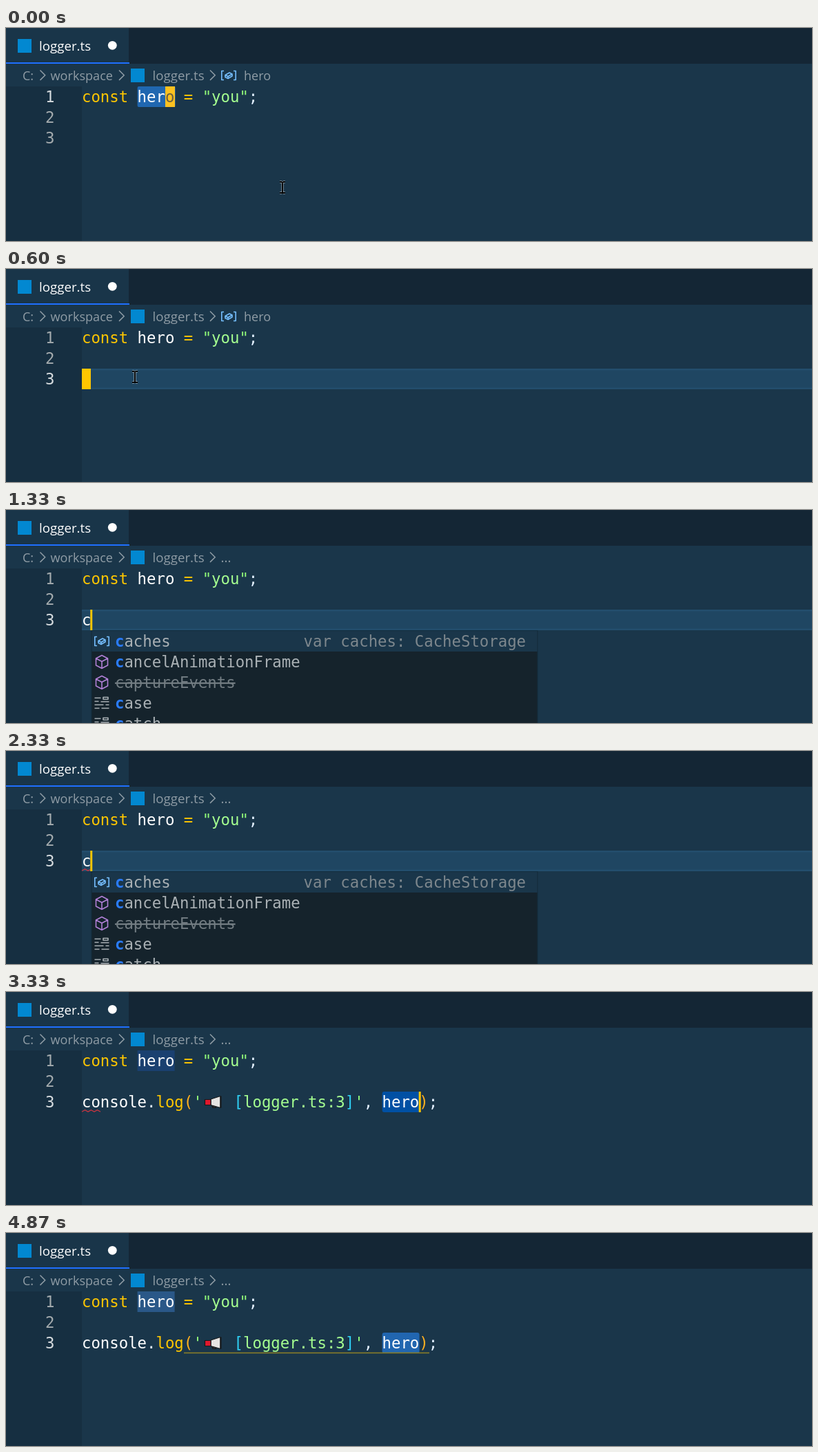
An HTML page for the animation above (5.4 s loop, 1169x310 px).

```html
<!DOCTYPE html>
<html lang="en">
<head>
<meta charset="utf-8">
<title>Logging snippet</title>
<style>
html, body { margin: 0; width: 100%; height: 100%; overflow: hidden; background: #193549; }
svg { display: block; width: 1169px; height: 310px; }
text { white-space: pre; }
.code { font: 22.32px "DejaVu Sans Mono", monospace; }
.ui { font-family: "Open Sans", sans-serif; }
.icon { fill: none; stroke-width: 1.6; stroke-linejoin: round; }
</style>
</head>
<body>
<svg id="stage" viewBox="0 0 1169 310"></svg>
<script>
const LOOP = 5400, CW = 13.44, LEFT = 110;
const C = {
  white: '#fff', yellow: '#ffc600', orange: '#ffb020', green: '#a5ff90', quote: '#92fc79',
  cyan: '#2fd0f5', grey: '#8f9ca5', dim: '#a3aaad', blue: '#2a7cff', pale: '#e1efff',
  field: '#75beff', violet: '#b180d7', label: '#a9b0b4', detail: '#7d878d'
};
const stage = document.getElementById('stage');

function add(parent, tag, attrs, content) {
  const node = document.createElementNS('http://www.w3.org/2000/svg', tag);
  for (const key in attrs) node.setAttribute(key, attrs[key]);
  if (content) node.textContent = content;
  parent.appendChild(node);
  return node;
}
const rect = (p, x, y, width, height, fill, more) => add(p, 'rect', { x, y, width, height, fill, ...more });
const path = (p, d, stroke, more) => add(p, 'path', { d, stroke, fill: 'none', ...more });
const ui = (p, x, y, size, fill, str) => add(p, 'text', { class: 'ui', x, y, 'font-size': size, fill }, str);

function code(p, x, y, runs, more) {
  const node = add(p, 'text', { class: 'code', x, y, ...more });
  for (const [fill, str, extra] of runs) add(node, 'tspan', { fill, ...extra }, str);
  return node;
}

// Hold each value in [[ms, value], ...] until the next one.
function steps(node, prop, table) {
  const frames = table.map(([ms, v]) => ({ offset: ms / LOOP, [prop]: v, easing: 'step-end' }));
  frames.push({ offset: 1, [prop]: table[table.length - 1][1] });
  node.animate(frames, { duration: LOOP, iterations: Infinity });
  return node;
}
function show(node, from, to) {
  const table = from ? [[0, 0], [from, 1]] : [[0, 1]];
  if (to) table.push([to, 0]);
  return steps(node, 'opacity', table);
}
const layer = (from, to) => show(add(stage, 'g', {}), from, to);

const ICONS = {
  field: [C.field, 'M-7 -6.5h-3.2v13h3.2M7 -6.5h3.2v13h-3.2M-5 -.5L1 -4L5 -2V1L-1 4.5L-5 2.5ZM-5 -.5L-1 1.5L5 -2M-1 1.5V4.5'],
  cube: [C.violet, 'M0 -9.5L8.5 -5V5L0 9.5L-8.5 5V-5ZM-8.5 -5L0 -.5L8.5 -5M0 -.5V9.5'],
  keyword: [C.label, 'M-10.5 -7.5h9M2 -8.5h7v3h-7zM-10.5 -2.5h6M-1.5 -2h12M-10.5 2.5h13M5.5 2.5h5M-10.5 7.5h7M-.5 7.5h11'],
  snippet: [C.label, 'M-9 6V-9H9V6M-9.5 9.2h2m2 0h2m2 0h2m2 0h2m2 0h2m2 0h2']
};
function icon(p, name, x, y) {
  const [colour, d] = ICONS[name];
  path(p, d, colour, { class: 'icon', transform: `translate(${x} ${y})` });
}

// Window chrome
rect(stage, 0, 0, 1169, 310, '#1a364a');
rect(stage, 0, 0, 1169, 52, '#142635');
rect(stage, 0, 0, 178, 52, '#193549');
rect(stage, 0, 50, 179, 2, '#1f6fff');
rect(stage, 0, 85, 110, 225, '#162f41');
rect(stage, 17, 16, 20, 20, '#0288d1');
ui(stage, 48, 33, 18.7, C.white, 'logger.ts');
add(stage, 'circle', { cx: 154.3, cy: 25.3, r: 6.4, fill: C.white });

// Breadcrumbs
ui(stage, 24, 76, 18, C.grey, 'C:');
ui(stage, 64.5, 76, 18.1, C.grey, 'workspace');
rect(stage, 181, 59, 20, 20, '#0288d1');
ui(stage, 212.5, 76, 18.7, C.grey, 'logger.ts');
for (const x of [49.5, 164, 296]) path(stage, `M${x} 61.5l7.2 7.2l-7.2 7.2`, C.grey, { 'stroke-width': 1.5 });
const crumb = layer(0, 730);
icon(crumb, 'field', 323, 69);
ui(crumb, 345, 76, 18, C.grey, 'hero');
ui(layer(730), 311.5, 76, 18.7, C.grey, '...');

// Current line and selections
function currentLine(y, from, to) {
  const g = layer(from, to);
  rect(g, LEFT, y, 1059, 30, '#234e6d');
  rect(g, LEFT, y + 2.5, 1059, 25, '#1f4662');
}
currentLine(85, 200, 600);
currentLine(145, 600, 3330);
show(rect(stage, 190.6, 85, 55, 30, '#2067b0', { rx: 2 }), 0, 200);

const marks = layer(3330);
const mix = (a, b, c) => [[0, a], [4330, b], [4400, c]];
steps(rect(marks, 190.6, 85, 54, 30, '#1a4070'), 'fill', [...mix('#1a4070', '#1f4778', '#244f80'), [4470, '#2a5888']]);
steps(rect(marks, 545.6, 145, 54, 30, '#0050a4', { rx: 3 }), 'fill', [...mix('#0050a4', '#0b57a8', '#165eac'), [4470, '#2166b0']]);

// Line numbers
[1, 2, 3].forEach((n, i) => {
  const num = code(stage, 57, 108 + 30 * i, [], { fill: C.dim });
  num.textContent = n;
  if (n === 1) steps(num, 'fill', [[0, '#d6dbde'], [600, C.dim]]);
  if (n === 3) steps(num, 'fill', [[0, C.dim], [600, '#d6dbde']]);
});

// Code
code(stage, LEFT, 108, [
  [C.yellow, 'const '], [C.white, 'hero '], [C.yellow, '= '],
  [C.quote, '"'], [C.green, 'you'], [C.quote, '"'], [C.pale, ';']
]);
code(layer(1130, 2530), LEFT, 168, [[C.white, 'c']]);
code(layer(2530, 3330), LEFT, 168, [[C.white, 'cl']]);

const call = layer(3330);
code(call, LEFT, 168, [[C.white, 'console'], [C.pale, '.'], [C.yellow, 'log'], [C.orange, '('], [C.quote, "'"]]);
code(call, 330.6, 168, [
  [C.cyan, '['], [C.green, 'logger.ts:3'], [C.cyan, ']'], [C.quote, "'"],
  [C.pale, ', '], [C.white, 'hero'], [C.orange, ')'], [C.pale, ';']
]);
const horn = add(call, 'g', { stroke: '#15181b', 'stroke-width': 1.2, 'stroke-linejoin': 'round' });
add(horn, 'path', { d: 'M298 164l2 4.5h4.5l-1 -4z', fill: '#2a2c30' });
add(horn, 'path', { d: 'M297 156L311 151.5V168.5L297 164.5Z', fill: '#e6e4e2' });
add(horn, 'path', { d: 'M288.5 156.5h8.5v8h-8.5z', fill: '#e0182d' });
add(horn, 'path', { d: 'M311.5 151.5v17', 'stroke-width': 2 });

// Diagnostics
function squiggle(width, from, to) {
  let d = 'M110 174.3';
  for (let x = 0, up = true; x < width; x += 4.5, up = !up) d += `l4.5 ${up ? -2.6 : 2.6}`;
  path(layer(from, to), d, '#cf3540', { 'stroke-width': 1.3 });
}
squiggle(12, 2330, 2670);
squiggle(26, 2670, 3530);
show(rect(stage, 258, 173.7, 356, 1.6, '#8a7f28'), 3800);

// Carets
function block(x, y, from, to, fill) {
  const g = layer(from, to);
  rect(g, x, y, 14, 30, fill);
  return g;
}
code(block(231, 85, 0, 200, '#fbc120'), 230.96, 108, [['#6a5f40', 'o']]);
code(block(231, 85, 200, 600, C.yellow), 230.96, 108, [['#2c4be0', 'o']]);
rect(layer(600, 870), 110, 145, 13, 30, C.yellow);

const caret = rect(stage, 0, 145, 3, 30, C.yellow);
const at = (ms, col) => [ms, `translate(${LEFT + col * CW - 1.2}px, 0px)`];
steps(caret, 'transform', [at(0, 0), at(1130, 1), at(2530, 2), at(3330, 36.45)]);
steps(caret, 'opacity', [
  [0, 0], [870, 1], [930, .8], [1000, .45], [1070, .15], [1130, 1],
  [2670, .5], [2800, 0], [3330, 1], [4670, .5], [4870, 0]
]);

// Suggestion lists
function popup(x, typed, detail, rows, from, to) {
  const g = layer(from, to);
  rect(g, x + .5, 175.5, 647, 150, '#15232c', { stroke: '#122c3c' });
  rect(g, x + 1, 176, 646, 30, '#1a364a');
  rows.forEach(([name, label, old], i) => {
    const y = 191 + 30 * i;
    icon(g, name, x + 15.5, y);
    code(g, x + 34.5, y + 8, old
      ? [['#727c82', label]]
      : [[C.blue, label.slice(0, typed), { 'font-weight': 'bold' }], [C.label, label.slice(typed)]],
      old ? { 'text-decoration': 'line-through', fill: '#727c82' } : {});
  });
  code(g, x + 630.5, 199, [[C.detail, detail]], { 'text-anchor': 'end' });
}
popup(123.5, 1, 'var caches: CacheStorage', [
  ['field', 'caches'], ['cube', 'cancelAnimationFrame'], ['cube', 'captureEvents', true],
  ['keyword', 'case'], ['keyword', 'catch']
], 1330, 2530);
popup(137, 2, 'console log', [
  ['snippet', 'cl'], ['keyword', 'class'], ['cube', 'clearInterval'],
  ['cube', 'clearTimeout'], ['field', 'clientInformation']
], 2530, 3330);

// Mouse pointer
const mouse = layer(0, 870);
const beam = 'M-4 -8h2.5l1.5 1l1.5 -1h2.5M0 -7V7M-4 8h2.5l1.5 -1l1.5 1h2.5';
path(mouse, beam, '#b9c4cb', { 'stroke-width': 3 });
path(mouse, beam, '#000', { 'stroke-width': 1.9 });
steps(mouse, 'transform', [
  [0, 401, 232], [130, 384, 231], [200, 349, 229], [270, 311, 227], [330, 273, 214], [400, 236, 193],
  [470, 207, 173], [530, 191, 160], [600, 187, 157], [670, 212, 166], [730, 390, 224]
].map(([ms, x, y]) => [ms, `translate(${x}px, ${y}px)`]));
</script>
</body>
</html>
```
